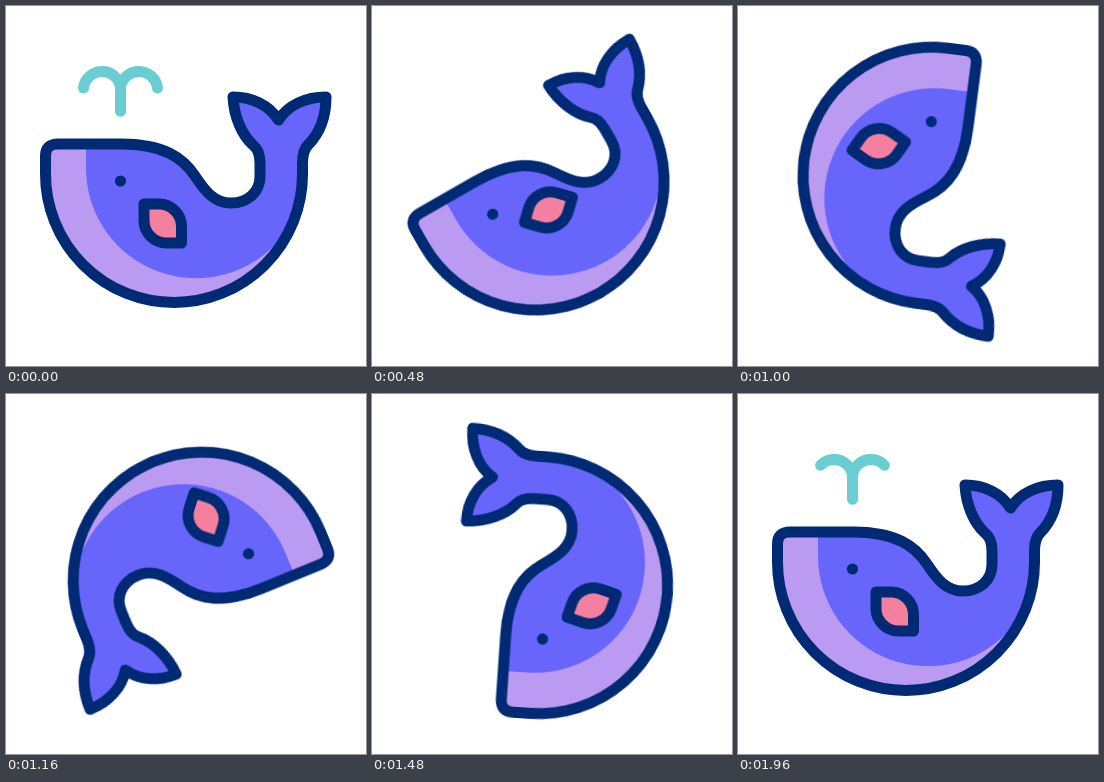
These frames come from a looping animation (360 px wide and 360 px high, 2000 ms). An HTML page:

```html
<!DOCTYPE html>
<html lang="en">
<head>
<meta charset="utf-8">
<title>Whale</title>
<style>
  html, body { margin: 0; width: 100%; height: 100%; overflow: hidden; background: #fff; }
  svg { display: block; width: 100vw; height: 100vh; }

  .line { fill: none; stroke: #012a74; stroke-width: 11; stroke-linecap: round; stroke-linejoin: round; }
  .whale, .fin, .spout path { animation: 2s cubic-bezier(.333, 0, .667, 1) infinite; }
  .whale { transform-origin: 180px 180px; animation-name: roll; }
  .fin { transform-origin: 138px 198px; animation-name: flap; }
  .spout path { stroke: #6acdd1; stroke-dasharray: 1 2; animation-name: spray; }

  /* tip forward, then roll over once */
  @keyframes roll {
    0% { transform: rotate(0deg); }
    21.7% { transform: rotate(-31deg); animation-timing-function: cubic-bezier(.315, 0, .664, 1); }
    97.35%, 100% { transform: rotate(360deg); }
  }
  @keyframes flap {
    0% { transform: rotate(0deg); }
    21.65% { transform: rotate(-45deg); }
    59% { transform: rotate(40deg); }
    85%, 100% { transform: rotate(0deg); }
  }
  @keyframes spray {
    0%, 100% { stroke-dashoffset: 0; }
    9%, 92% { stroke-dashoffset: 1.05; }
  }
</style>
</head>
<body>
<svg viewBox="0 0 360 360">
  <defs>
    <path id="body" d="M52 138H115C158 138 177 152 189 170C199 185 208 197 225 197C242 197 254 186 254 170V157C254 148 252 143 247 139C236 129 228 111 227 91C246 91 263 99 272.500 114C282 99 300 91 320 91C320 111 313 128 302 139C298 143 296.500 148 296.500 157V168A128.500 128.500 0 0 1 39.500 168V150Q39.500 138 52 138Z"/>
    <clipPath id="inside"><use href="#body"/></clipPath>
  </defs>
  <g class="whale">
    <g class="spout line">
      <path pathLength="1" d="M114.500 105V81A18.700 18.700 0 0 0 77.500 82"/>
      <path pathLength="1" d="M114.500 105V81A18.700 18.700 0 0 1 151.500 82"/>
    </g>
    <use href="#body" fill="#bb9af2"/>
    <path clip-path="url(#inside)" fill="#6865fa" d="M80 130V162A110 110 0 0 0 275 232L340 200V60H80Z"/>
    <use href="#body" class="line"/>
    <circle cx="114.500" cy="175" r="5.600" fill="#012a74"/>
    <path class="fin line" style="fill:#f47f9e" d="M138 198H153A22.500 22.500 0 0 1 175.500 220.500V237H160.500A22.500 22.500 0 0 1 138 214.500Z"/>
  </g>
</svg>
</body>
</html>
```
